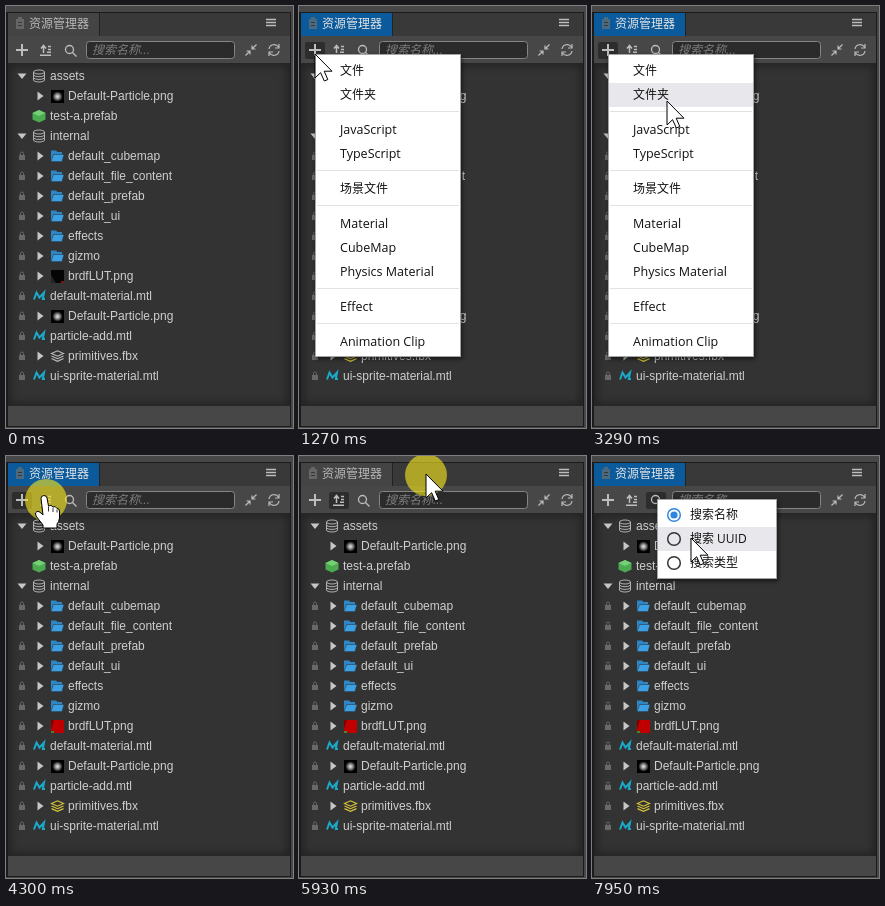
An HTML page for the animation above (8000 ms loop, 287 by 422 pixels).

```html
<!DOCTYPE html>
<html lang="zh">
<head>
<meta charset="utf-8">
<title>资源管理器</title>
<style>
html, body { margin: 0; width: 100%; height: 100%; overflow: hidden; background: #474747 }
svg { display: block }
text { font: 12px "Liberation Sans", "Noto Sans CJK SC", sans-serif; fill: #cfcfcf; white-space: pre }
.tab { fill: #b8b8b8 }
.hint { font-style: italic; fill: #7d7d7d }
.item { font-family: "Open Sans", "Noto Sans CJK SC", sans-serif; fill: #111 }
.latin { font-size: 12.5px }
.line { fill: none; stroke: #bdbdbd; stroke-width: 1.2 }
.inset { fill: none; stroke: #000; stroke-opacity: .45; stroke-width: 6; filter: blur(4px) }
.popup { fill: #fff; stroke: #a5a5a5; filter: drop-shadow(1px 2px 2px #0009) }
</style>
</head>
<body>
<svg id="stage" width="287" height="422" viewBox="0 0 287 422"></svg>
<script>
const LOOP = 8000;
const stage = document.getElementById('stage');

const at = (x, y, s) => `<g transform="translate(${x} ${y})">${s}</g>`;
const rect = (x, y, w, h, fill, more = '') =>
  `<rect x="${x}" y="${y}" width="${w}" height="${h}" fill="${fill}" ${more}/>`;
const fill = (d, color, more = '') => `<path d="${d}" fill="${color}" ${more}/>`;
const line = (d, style = '') => `<path class="line" d="${d}" style="${style}"/>`;
const text = (x, y, s, cls = '', style = '') =>
  `<text x="${x}" y="${y}" class="${cls}" style="${style}">${s}</text>`;
const within = (t, a, b) => t >= a && t < b;

const icons = {
  db: () => line('M-5.5-4a5.5 2 0 1 0 11 0a5.5 2 0 1 0-11 0v8a5.5 2 0 0 0 11 0v-8M-5.5-1.3a5.5 2 0 0 0 11 0M-5.5 1.4a5.5 2 0 0 0 11 0',
    'stroke:#b0b0b0;stroke-width:1'),
  prefab: () => fill('M0-6L6.5-3V3.5L0 6.5L-6.5 3.5V-3Z', '#4cab50') +
    fill('M0-6L6.5-3L0 0L-6.5-3Z', '#74cf76'),
  folder: () => fill('M-6 5.5V-5.5H-1L.5-4H5V5.5Z', '#2f86c4') +
    fill('M-6 5.5L-3.5-1.5H7L5 5.5Z', '#3da0e3', 'stroke="#2b3b48" stroke-width=".6"'),
  spot: () => rect(-6, -6, 13, 13, '#000') + rect(-6, -6, 13, 13, 'url(#glow)'),
  lut: t => t < 1270
    ? rect(-6, -6, 13, 13, '#050505') + fill('M-6-1L-1 7H-6Z', '#242424') + rect(4, 5, 3, 2, '#7a1616')
    : rect(-6, -6, 13, 13, '#c00000') + fill('M-6-6H-3L-6 3Z', '#800000') + rect(-6, 5, 3, 2, '#3d8a2c'),
  material: () => line('M-5 3.5L-2.5-3.5L.5 1.5L5-3.5L3.8 3H6', 'stroke:#1ba9c9;stroke-width:2'),
  mesh: t => line('M-5.5-2.5L.5-5.2L6.5-2.5L.5 .2ZM-5.5 0L.5 2.7L6.5 0M-5.5 2.6L.5 5.3L6.5 2.6',
    t < 1270 ? 'stroke-width:1.1' : 'stroke:#d9c53a'),
};

// name, icon, depth, arrow (v open, > closed), locked
const rows = [
  ['assets', 'db', 0, 'v'],
  ['Default-Particle.png', 'spot', 1, '>'],
  ['test-a.prefab', 'prefab', 0, ''],
  ['internal', 'db', 0, 'v'],
  ...['default_cubemap', 'default_file_content', 'default_prefab', 'default_ui', 'effects', 'gizmo']
    .map(name => [name, 'folder', 1, '>', 1]),
  ['brdfLUT.png', 'lut', 1, '>', 1],
  ['default-material.mtl', 'material', 0, '', 1],
  ['Default-Particle.png', 'spot', 1, '>', 1],
  ['particle-add.mtl', 'material', 0, '', 1],
  ['primitives.fbx', 'mesh', 1, '>', 1],
  ['ui-sprite-material.mtl', 'material', 0, '', 1],
];

const createMenu = [['文件', '文件夹'], ['JavaScript', 'TypeScript'], ['场景文件'],
  ['Material', 'CubeMap', 'Physics Material'], ['Effect'], ['Animation Clip']];

// start, end, step count, [step, x, y] keys of the pointer
const moves = [
  [270, 890, 9, [[1, 92, 358], [5, 28, 110], [7, 17, 65], [9, 16, 48]]],
  [2220, 2910, 10, [[0, 16, 48], [6, 105, 152], [10, 118, 222]]],
  [3060, 3680, 9, [[0, 118, 222], [4, 75, 95], [9, 39, 47]]],
  [4000, 4150, 3, [[0, 39, 47], [3, 40, 43]]],
  [5070, 5760, 10, [[0, 40, 43], [10, 127, 18]]],
  [6160, 6540, 6, [[0, 127, 18], [4, 80, 45], [6, 65, 43]]],
  [7640, 7950, 5, [[0, 65, 43], [5, 99, 82]]],
];
const clicks = [[1120, 1270], [4300, 4460], [5930, 6000], [6700, 6860]];

function pointer(t) {
  const move = moves.filter(m => t >= m[0]).pop();
  if (!move) return null;
  const [start, end, count, keys] = move;
  const step = Math.min(count, Math.floor((t - start) / (end - start) * (count - 1) + .1) + 1);
  const i = Math.max(1, keys.findIndex(k => k[0] >= step));
  const [a, b] = [keys[i - 1], keys[i]];
  const f = (step - a[0]) / (b[0] - a[0]);
  return { x: Math.round(a[1] + (b[1] - a[1]) * f), y: Math.round(a[2] + (b[2] - a[2]) * f) };
}

function openPopup(t) {
  if (within(t, 1270, 4300)) return 'create';
  if (within(t, 4460, 5930)) return 'sort';
  if (t >= 6860) return 'search';
  return '';
}

function pressedButton(t) {
  if (within(t, 1270, 4380)) return 16;
  if (within(t, 4380, 6000)) return 40;
  return t >= 6860 ? 64 : 0;
}

function header(t) {
  const active = within(t, 1120, 5930) || t >= 6700;
  const badge = active ? '#4b6a80' : '#666';
  return rect(0, 6, 285, 415, '#1b1b1b') + rect(2, 7, 282, 23, '#393939') +
    rect(2, 7, 91, 23, active ? '#0b5a9b' : '#444') + rect(93, 7, 1, 23, '#222') +
    rect(2, 30, 282, 390, '#474747') +
    rect(10, 13, 8, 10, badge) + rect(12, 11, 4, 3, badge) +
    line('M12 16.5h4M12 19.5h4', 'stroke:#383838;stroke-width:1') +
    text(23, 22, '资源管理器', 'tab', active ? 'fill:#e4e4e4' : '') +
    line('M260 13.5h10M260 16.5h10M260 19.5h10', 'stroke-width:1.5');
}

function toolbar(t, popup, p) {
  const pressed = pressedButton(t);
  const hover = p && !popup && p.x >= 80 && p.x < 229 && p.y >= 35 && p.y < 53;
  return (pressed ? rect(pressed - 10, 36, 20, 17, '#2d2d2d', 'rx="2"') : '') +
    line('M16 38v12M10 44h12', 'stroke-width:2') +
    at(40, 44, line('M-2.5 3V-4M-5-1.5L-2.5-4.5L0-1.5M2-3.5h3M2-.5h3M1 2.3h4M-6 5.2h11', 'stroke-width:1.5')) +
    line('M66.5 46.5l4 4M67.5 43.5a4 4 0 1 1-8 0a4 4 0 1 1 8 0', 'stroke-width:1.3') +
    rect(80.5, 35.5, 148, 17, '#2b2b2b', `rx="3" stroke="${hover ? '#b5b5b5' : '#858585'}"`) +
    text(86, 48, '搜索名称...', 'hint') +
    at(245, 44, line('M5.5-5.5L1-1M1-4.5V-1H4.5M-5.5 5.5L-1 1M-1 4.5V1H-4.5')) +
    at(268, 44, line('M-5-1A5.2 5.2 0 0 1 4.5-3M5-6V-2H1M5 1A5.2 5.2 0 0 1-4.5 3M-5 6V2H-1'));
}

function tree(t, popup, p) {
  const hover = p && !popup ? Math.floor((p.y - 60) / 20) : -1;
  const list = rows.map(([name, icon, depth, arrow, locked], i) => {
    const x = 33 + depth * 18;
    return (i === hover ? rect(2, 60 + i * 20, 282, 20, '#4a4a4a') : '') + at(0, 70 + i * 20,
      (locked ? rect(13, -1, 6, 5, '#686868') + line('M14.5-1V-2.5a1.5 1.5 0 0 1 3 0V-1', 'stroke:#686868;stroke-width:1') : '') +
      (arrow === 'v' ? fill('M11.5-2.5h9L16 3Z', '#c6c6c6') : '') +
      (arrow === '>' ? fill('M31.5-4.5L37.5 0L31.5 4.5Z', '#c6c6c6') : '') +
      at(x, 0, icons[icon](t)) + text(x + 11, 4, name));
  }).join('');
  return rect(2, 57, 282, 343, '#333') +
    '<svg x="2" y="57" width="282" height="343"><rect class="inset" x="-1" y="-1" width="284" height="345"/></svg>' +
    list;
}

const item = (x, y, s) => text(x, y + 4, s, /[一-龥]/.test(s) ? 'item' : 'item latin');
const box = (x, y, w, h) => rect(x + .5, y + .5, w - 1, h - 1, '#fff', 'class="popup"');
const highlight = (x, y, w, p) =>
  p.x > x && p.x < x + w && p.y >= y - 12 && p.y < y + 12 ? rect(x + 1, y - 12, w - 2, 24, '#e8e8ec') : '';

function createPopup(p) {
  let y = 65, out = box(16, 48, 146, 303);
  createMenu.forEach((group, i) => {
    if (i) {
      out += rect(18, y - 8, 142, 1, '#e2e2e2');
      y += 11;
    }
    for (const name of group) {
      out += highlight(16, y, 146, p) + item(41, y, name);
      y += 24;
    }
  });
  return out;
}

function radioPopup(x, top, names, p) {
  return box(x, top, 120, names.length * 24 + 8) + names.map((name, i) => {
    const y = top + 16 + i * 24, color = i ? '#333' : '#2f86e0';
    return highlight(x, y, 120, p) +
      `<circle cx="${x + 17}" cy="${y}" r="6.3" fill="none" stroke="${color}" stroke-width="1.5"/>` +
      (i ? '' : `<circle cx="${x + 17}" cy="${y}" r="3.6" fill="${color}"/>`) +
      item(x + 33, y, name);
  }).join('');
}

const popups = {
  create: createPopup,
  sort: p => radioPopup(40, 43, ['按名称排序', '按类型排序'], p),
  search: p => radioPopup(65, 43, ['搜索名称', '搜索 UUID', '搜索类型'], p),
};

const outline = 'stroke="#000" stroke-width="1" stroke-linejoin="round"';
const arrowShape = fill('M0 0V24L5.6 18.7L9.3 27L12.8 25.5L9.2 17.2H17Z', '#fff', outline);
const handShape = at(-1, -3,
  fill('M-4 2.5Q-4-.5-1-.5Q1.5-.5 2 2L3.5 10Q6 8 8 11Q10.5 9.5 12 12.5Q14 12 14.5 15V22Q14 26 12 28V32H-2V29L-9 20Q-10.5 16-8 15.5Q-6 15-4 17L-2 19Z', '#fff', outline) +
  line('M3.5 10.5v5M8 12v4M12 13.5v3', 'stroke:#000;stroke-width:.8'));

function cursor(t, popup, p) {
  const onButton = p.y > 35 && p.y < 54 && [16, 40, 65].some(x => Math.abs(p.x - x) < 11);
  const onFold = p.y >= 60 && p.x < 24;
  const click = clicks.some(([a, b]) => within(t, a, b));
  return at(p.x, p.y,
    (click ? '<circle cy="1" r="21" fill="#f5e51e" opacity=".62"/>' : '') +
    (!popup && (onButton || onFold) ? handShape : arrowShape));
}

const defs = '<defs><radialGradient id="glow"><stop stop-color="#e4e4e4"/>' +
  '<stop offset=".3" stop-color="#a0a0a0"/><stop offset=".8" stop-color="#000"/></radialGradient></defs>';

function scene(t) {
  const p = pointer(t), popup = openPopup(t);
  return defs + header(t) + toolbar(t, popup, p) + tree(t, popup, p) +
    (popup ? popups[popup](p) : '') + (p ? cursor(t, popup, p) : '');
}

let shown = '';
const begin = performance.now();
function frame() {
  const next = scene((performance.now() - begin) % LOOP);
  if (next !== shown) stage.innerHTML = shown = next;
  requestAnimationFrame(frame);
}
frame();
</script>
</body>
</html>
```
